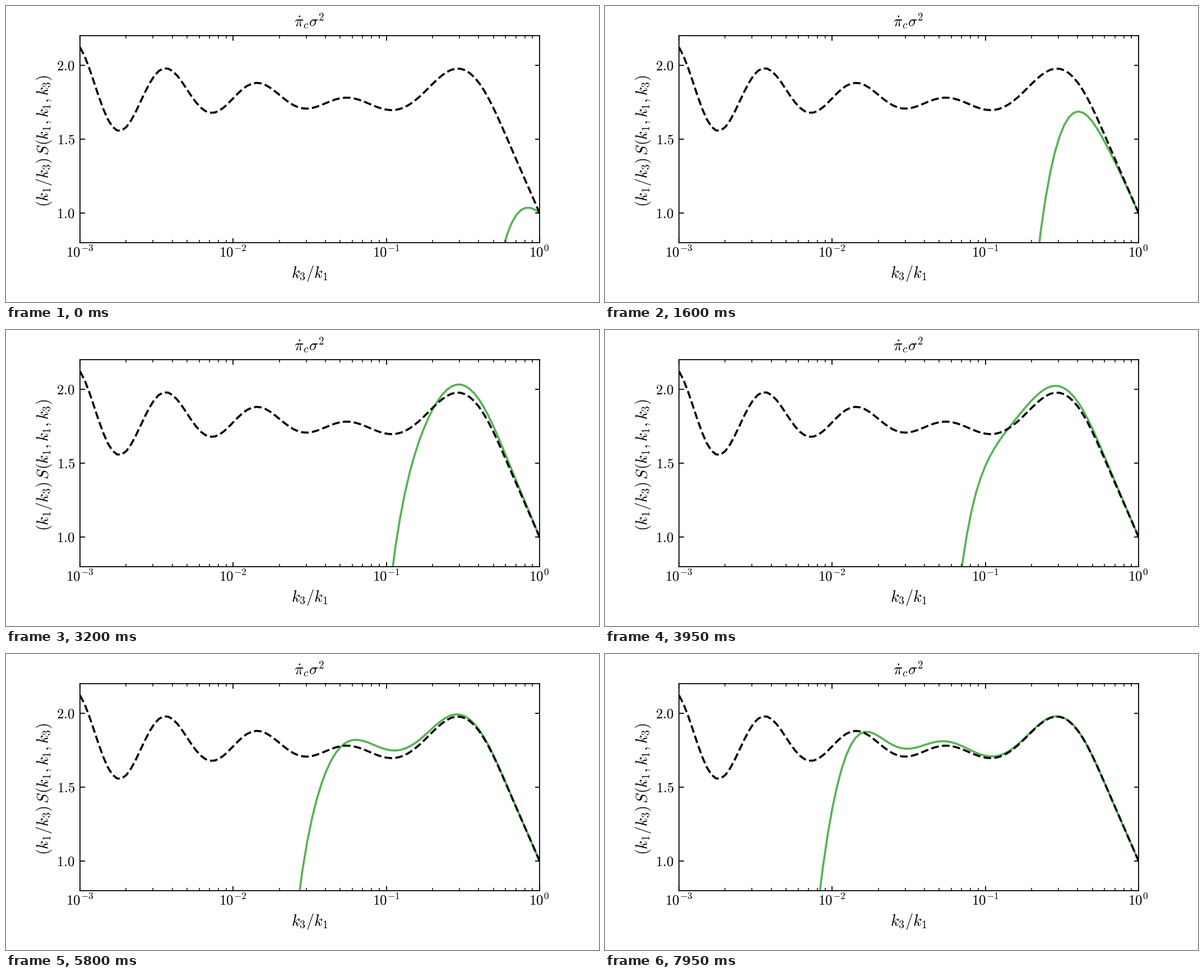
Animation, 1058 px wide and 529 px high, one loop 8 s. Source, as a matplotlib script:

```python
import numpy as np
import matplotlib.pyplot as plt
from matplotlib.animation import FuncAnimation

W, H, DPI = 1058, 529, 100
FRAMES, STEP = 160, 50
LEFT, RIGHT, TOP, BOTTOM = 132, 952, 53, 423
DECADE = (RIGHT - LEFT) / 3
PT = 72 / DPI  # points per pixel

plt.rcParams["mathtext.fontset"] = "cm"


def bell(x, centre, width):
    return np.exp(-((x - centre) / width) ** 2)


def final(x):
    """Late-time curve in stage pixels: a fading ripple, a peak and a slope."""
    ripple = 56 * np.exp((242 - x) / 237) * np.cos(2 * np.pi * (x - 287.5) / 164.6)
    slope = 2.29 * 18 * np.log1p(np.exp((x - 859) / 18))
    peak = 61.5 * bell(x, 813, 68) - 23 * bell(x, 700, 177)
    return 157.5 - ripple + slope - peak


def beat(t):
    return np.cos(2 * np.pi * (t - 3200) / 2550)


def edge_at(t):
    """Where the green curve meets the lower axis."""
    return 894.7 - 0.065 * t + 0.00105 * t * beat(t) - 19.5 * bell(t, 1100, 950)


def fade(x):
    """Both curves share the point at the right axis."""
    return 1 - np.exp((x - RIGHT) / 45)


def flow(t):
    edge = edge_at(t)
    u = xs - edge
    s = np.clip((t - 1100) / 2000, 0, 1)
    over = s * s * (3 - 2 * s)  # overshoot grows in
    gap = (1 + over) * np.exp(-u / (44.5 - 1.3 * over * beat(t)))
    gap -= over * np.exp(-u / 72)
    drop = BOTTOM - final(edge)
    return final(xs) + drop * gap * fade(xs) / fade(edge)


xs = np.linspace(LEFT, RIGHT, 100)

fig = plt.figure(figsize=(W / DPI, H / DPI), dpi=DPI, facecolor="white")
ax = fig.add_axes([LEFT / W, 1 - BOTTOM / H,
                   (RIGHT - LEFT) / W, (BOTTOM - TOP) / H])
ax.set(xlim=(LEFT, RIGHT), ylim=(BOTTOM, TOP), xticks=[], yticks=[])
for side in ax.spines.values():
    side.set_linewidth(1.8 * PT)


def ticks(x, y, marker, size, width):
    x, y = np.broadcast_arrays(x, y)
    ax.plot(x, y, ls="none", marker=marker, ms=size * PT, mew=width * PT,
            color="black", clip_on=False, zorder=3)


def label(x, y, text, size, **kw):
    kw = {"ha": "center", "va": "baseline", **kw}
    fig.text(x / W, 1 - y / H, f"${text}$", fontsize=size, **kw)


major = LEFT + DECADE * np.arange(4)
minor = (major[:3, None] + DECADE * np.log10(np.arange(2, 10))).ravel()
for place, size, width in ((major, 8.5, 1.8), (minor, 5, 1.5)):
    ticks(place, BOTTOM, 2, size, width)
    ticks(place, TOP, 3, size, width)
for power, x in zip((-3, -2, -1, 0), major):
    label(x - 0.5, 448.5, f"10^{{{power}}}", 18)

for value in (1.0, 1.5, 2.0):
    y = BOTTOM - (value - 0.8) * (BOTTOM - TOP) / 1.4
    ticks(LEFT, y, 1, 8.5, 1.8)
    ticks(RIGHT, y, 0, 8.5, 1.8)
    label(123, y + 8.5, f"{value:.1f}", 17.8, ha="right")

label(541.5, 37, r"\dot{\pi}_c\sigma^2", 19.5)
label(541.5, 486, "k_3/k_1", 20.3)
label(76, 241.5, r"(k_1/k_3)\,S(k_1,k_1,k_3)", 20.3,
      rotation=90, rotation_mode="anchor")

green, = ax.plot(xs, flow(0), color="tab:green", alpha=0.8, lw=3.67 * PT)
ax.plot(xs, final(xs), "--", color="black", lw=3.67 * PT)


def update(frame):
    green.set_ydata(flow(frame * STEP))
    return green,


anim = FuncAnimation(fig, update, frames=FRAMES, interval=STEP,
                     repeat=True, repeat_delay=0)
plt.show()
```
